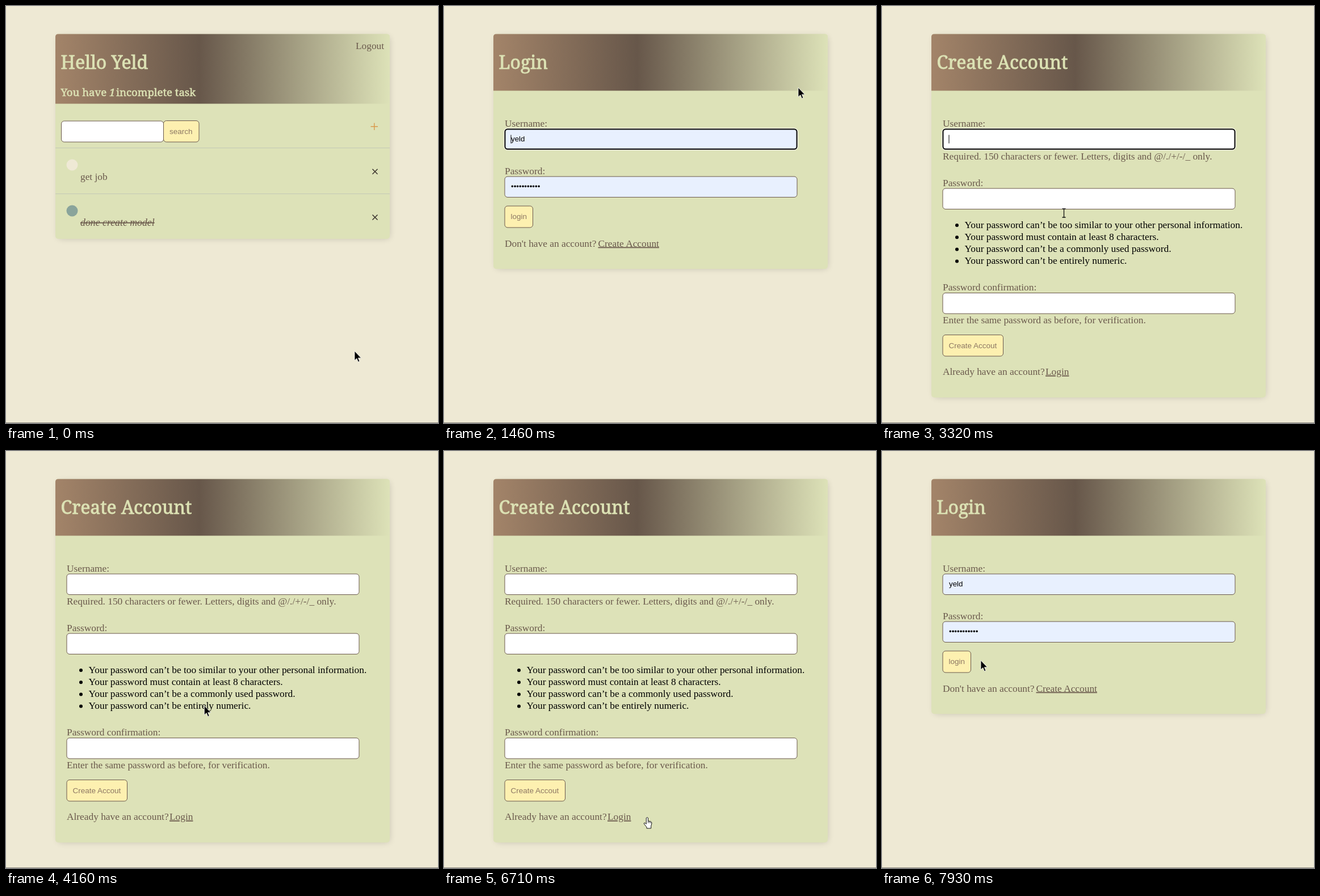
These frames come from a looping animation (761x736 px, 8000 ms). An HTML page:

```html
<!DOCTYPE html>
<html lang="en">
<head>
<meta charset="utf-8">
<title>To-do app</title>
<style>
html, body { margin: 0; width: 100%; height: 100%; overflow: hidden; background: #eee9d4; }
svg { display: block; width: 761px; height: 736px; }
text { font: 17.35px "Liberation Serif", serif; fill: #6a594c; white-space: pre; }
.head { font: 32px "Noto Serif", serif; fill: #dce2b4; stroke: #dce2b4; stroke-width: .9; }
.sub { font: 18.6px "Noto Serif", serif; fill: #dce2b4; stroke: #dce2b4; stroke-width: .6; }
.em { font-style: italic; }
.done { font-size: 17.8px; font-style: italic; text-decoration: line-through; }
.link { text-decoration: underline; }
.item { fill: #000; }
.btn { font: 13.5px "Liberation Sans", sans-serif; fill: #8d7763; }
.typed { font: 13.333px "Liberation Sans", sans-serif; fill: #000; }
.shadow { filter: blur(6.5px); }
</style>
</head>
<body>
<svg id="stage" viewBox="0 0 761 736" xmlns="http://www.w3.org/2000/svg"></svg>
<script>
const LOOP = 8000;
const BROWN = '#6a594c';

const rect = (x, y, w, h, fill, more = '') =>
  `<rect x="${x}" y="${y}" width="${w}" height="${h}" fill="${fill}" ${more}/>`;
const text = (x, y, str, cls = '') => `<text x="${x}" y="${y}" class="${cls}">${str}</text>`;
const stroke = (d, color, width) => `<path d="${d}" fill="none" stroke="${color}" stroke-width="${width}"/>`;
const box = (x, y, w, h, fill) => rect(x, y, w, h, fill, `rx="5" stroke="${BROWN}"`);
const field = (y, fill = '#fff') => box(107, y, 515, 36.5, fill);
const button = (x, y, w, h, label) =>
  box(x, y, w, h, '#fdf0b0') + text(x + 10.5, y + 23, label, 'btn');

// Card with a gradient header
function card(bottom, headBottom, title) {
  return rect(93, 55.5, 581, bottom - 57.5, '#000', 'class="shadow" opacity=".21"') +
    rect(87, 49.5, 589, bottom - 49.5, '#dde2b8', 'rx="5"') +
    `<path d="M87 ${headBottom}V54.5Q87 49.5 92 49.5H671Q676 49.5 676 54.5V${headBottom}Z" fill="url(#sweep)"/>` +
    text(96.5, 111, title, 'head');
}

const focusRing = fill => `<g class="focus">` +
  rect(105.8, 215.8, 517.4, 38.4, 'none', 'rx="6" stroke="#fff"') +
  rect(107.5, 217.5, 514, 35, fill, 'rx="4.5" stroke="#101010" stroke-width="2"') + '</g>';
const caret = '<path class="caret" d="M118 227.5V242.5" stroke="#000"/>';

function tasksPage() {
  const row = y => rect(87, y, 589, 1, '#c3c9b6');
  const cross = y => stroke(`M645.5 ${y - 4.5}l9 9m0 -9l-9 9`, '#3a332d', 1.5);
  return card(411, 172.5, 'Hello Yeld') +
    text(616, 76, 'Logout') +
    text(96.5, 158.5, 'You have', 'sub') +
    text(182, 158.5, '1', 'sub em') +
    text(194, 158.5, 'incomplete task', 'sub') +
    box(97.5, 203, 180, 37, '#fff') +
    button(277.5, 202.5, 62.5, 37.5, 'search') +
    stroke('M642.5 212.8h12.5M648.8 206.5v12.5', '#d9994c', 1.4) +
    row(250) + row(331) +
    `<circle cx="116.5" cy="280.5" r="10" fill="#efe9d5"/>` +
    `<circle cx="116.5" cy="361.5" r="10" fill="#8aa49b"/>` +
    text(131, 307, 'get job') + cross(292.3) +
    text(131, 388, 'done create model', 'done') + cross(373);
}

function loginPage() {
  const fill = '#e8f0fe';
  return card(464, 149.5, 'Login') +
    text(107, 212.5, 'Username:') + field(217, fill) + focusRing(fill) +
    text(118, 238.5, 'yeld', 'typed') + caret +
    text(107, 296.5, 'Password:') + field(301, fill) +
    text(118, 322.5, '•'.repeat(11), 'typed') +
    button(107, 353, 49.5, 38, 'login') +
    text(107, 424.5, "Don't have an account?") +
    text(271.5, 424.5, 'Create Account', 'link');
}

function createPage() {
  const rules = [
    'can’t be too similar to your other personal information.',
    'must contain at least 8 characters.',
    'can’t be a commonly used password.',
    'can’t be entirely numeric.'
  ];
  const list = rules.map((rule, i) =>
    `<circle cx="132" cy="${387 + i * 21.2}" r="3"/>` +
    text(145.5, 391.5 + i * 21.2, 'Your password ' + rule, 'item')).join('');
  return card(691, 149.5, 'Create Account') +
    text(107, 212.5, 'Username:') + field(217) + focusRing('#fff') + caret +
    text(107, 270.5, 'Required. 150 characters or fewer. Letters, digits and @/./+/-/_ only.') +
    text(107, 317.5, 'Password:') + field(322) + list +
    text(107, 502, 'Password confirmation:') + field(506.5) +
    text(107, 560, 'Enter the same password as before, for verification.') +
    button(107, 580.5, 106.5, 37.5, 'Create Accout') +
    text(107, 651, 'Already have an account?') +
    text(288, 651, 'Login', 'link');
}

const cursors = {
  arrow: '<path d="M0 0V16.5L3.8 13L6.4 19.2L8.9 18.1L6.4 12.2H11.6Z" stroke="#fff" stroke-width=".8"/>',
  hand: '<path d="M-1.7 1.2Q0 -1 1.5 1.2V6.4L6.4 7.6Q8 8.3 8 10.5L6.7 15.5V19.5H-1V17.3L-5.7 11.5Q-6 9.6 -4.2 9.9L-1.7 11.8Z" fill="#fff" stroke="#111"/>' +
    stroke('M1.5 6.5v3.6M3.8 7.2v3M6 8v2.6', '#111', .8),
  beam: stroke('M-3 -7.5H-.6L0 -7L.6 -7.5H3M0 -7V7M-3 7.5H-.6L0 7L.6 7.5H3', '#111', 1.3)
};

const group = (id, body) => `<g id="${id}">${body}</g>`;
const stage = document.getElementById('stage');
stage.innerHTML =
  `<defs><linearGradient id="sweep" gradientUnits="userSpaceOnUse" x1="87" x2="676">
    <stop stop-color="#a38469"/><stop offset=".43" stop-color="#67574a"/><stop offset="1" stop-color="#dde2b8"/>
  </linearGradient></defs>` +
  rect(0, 0, 761, 736, '#eee9d4') + rect(0, 735, 761, 1, '#8b8980') +
  group('tasks', tasksPage()) + group('login', loginPage()) + group('create', createPage()) +
  group('pointer', Object.keys(cursors).map(k => group(k, cursors[k])).join(''));

// The pointer is sampled in bursts: first time, last time, steps
const bursts = [
  [260, 1200, 7], [1320, 1460, 2], [1580, 2360, 7], [2480, 3170, 6], [3320, 3470, 2],
  [3620, 4550, 8], [4700, 5210, 5], [5330, 5710, 4], [5830, 6090, 3], [6390, 6390, 1],
  [6710, 6710, 1], [6850, 7660, 7], [7810, 7930, 2]
];
const ticks = [0];
for (const [from, to, n] of bursts)
  for (let i = 0; i < n; i++) ticks.push(Math.round(from + (to - from) * i / Math.max(1, n - 1)));

// Pointer path: time, x, y, shape from here on
const path = [
  [0, 614, 609, 'arrow'], [240, 614, 609, 'arrow'], [730, 655, 330, 'arrow'], [1040, 676, 112, 'arrow'],
  [1200, 645, 66, 'hand'], [1320, 640, 76, 'hand'], [1460, 624, 144, 'arrow'],
  [1700, 540, 228, 'beam'], [1850, 470, 280, 'arrow'], [2000, 405, 330, 'beam'], [2130, 370, 370, 'arrow'],
  [2360, 335, 414, 'hand'], [2900, 330, 417, 'hand'], [3030, 362, 415, 'hand'], [3170, 481, 404.5, 'hand'],
  [3320, 320.5, 365.5, 'beam'], [3620, 316, 340, 'beam'], [3900, 335, 400, 'arrow'],
  [4550, 372, 528, 'beam'], [4700, 368, 490, 'arrow'], [5080, 302, 300, 'arrow'],
  [5210, 313.5, 287, 'arrow'], [5330, 318, 258, 'arrow'], [5580, 374, 480, 'arrow'],
  [5710, 335, 662, 'arrow'], [5830, 318, 650, 'hand'], [6090, 319, 644, 'hand'],
  [6390, 319, 646, 'hand'], [6710, 358, 646.5, 'hand'], [6850, 366, 600, 'arrow'],
  [7250, 362, 440, 'arrow'], [7660, 343, 383, 'arrow'], [7810, 152, 372, 'arrow'], [7930, 174, 369.5, 'arrow']
];

function pointerAt(t) {
  let i = path.length - 1;
  while (path[i][0] > t) i--;
  const a = path[i], b = path[i + 1] || a;
  const k = b === a ? 0 : (t - a[0]) / (b[0] - a[0]);
  return { x: a[1] + (b[1] - a[1]) * k, y: a[2] + (b[2] - a[2]) * k, shape: a[3] };
}

const pageAt = t => t < 1320 ? ['tasks', 0] : t < 3320 ? ['login', 1320] :
  t < 6850 ? ['create', 3320] : ['login', 6850];
const focusedAt = t => t < 3030 || (t >= 3320 && t < 4020) || (t >= 6850 && t < 7520);
const show = (el, on) => { el.style.display = on ? '' : 'none'; };
const byId = id => document.getElementById(id);

function draw(t) {
  const [page, since] = pageAt(t);
  for (const id of ['tasks', 'login', 'create']) show(byId(id), id === page);
  const focused = focusedAt(t);
  stage.querySelectorAll('.focus').forEach(el => show(el, focused));
  const lit = focused && (t - since) % 1060 < 530;
  stage.querySelectorAll('.caret').forEach(el => show(el, lit));

  const p = pointerAt(ticks.filter(k => k <= t).pop());
  byId('pointer').setAttribute('transform', `translate(${p.x} ${p.y})`);
  for (const id in cursors) show(byId(id), id === p.shape);
}

function tick() {
  draw(performance.now() % LOOP);
  requestAnimationFrame(tick);
}
tick();
</script>
</body>
</html>
```
